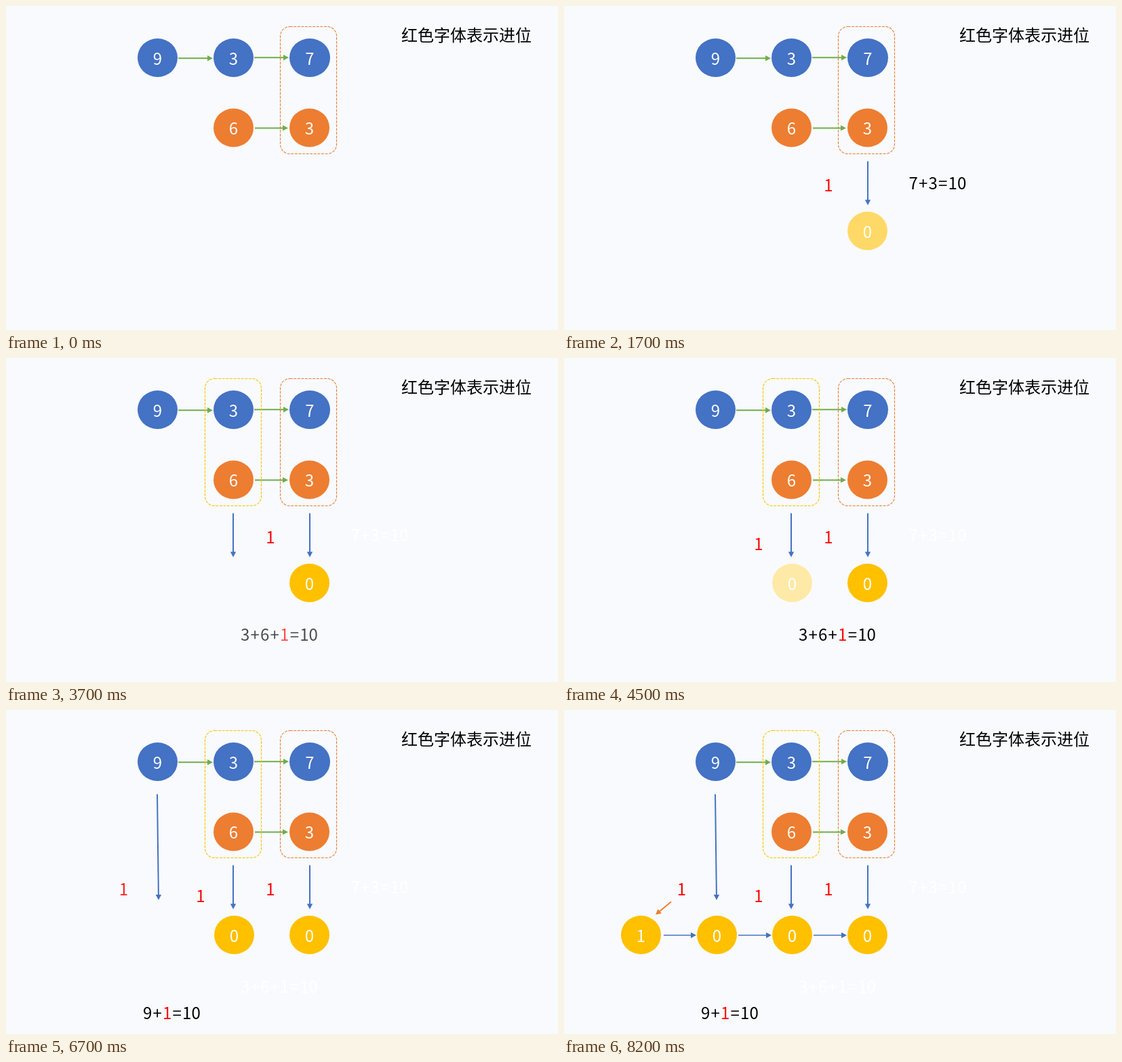
Write an HTML page that moves like this. It is 814 px wide and 479 px high and loops after 8500 ms.

```html
<!DOCTYPE html>
<html lang="zh">
<head>
<meta charset="utf-8">
<title>链表相加</title>
<style>
  html, body { margin: 0; width: 100%; height: 100%; overflow: hidden; background: #f8fafe; }
  svg { display: block; width: 814px; height: 479px; }
  text { font: 300 24px "Noto Sans CJK SC", "Noto Sans CJK", "Noto Sans", sans-serif; }
  .ghost * { fill: #fff; stroke: #fff; }
  .ghost text, .ghost tspan { stroke: none; }
  .ghost rect { fill: none; }
</style>
</head>
<body>
<svg id="stage" viewBox="0 0 814 479"></svg>
<script>
const BLUE = '#4472c4', ORANGE = '#ed7d31', GOLD = '#ffc000', GREEN = '#70ad47', RED = '#f00';
const LOOP = 8500, FRAME = 100, LAST = 8200, FADE = 487, LEAD = 50;
const stage = document.getElementById('stage');

const node = (x, y, digit, color, rx = 29.5) =>
  `<ellipse cx="${x}" cy="${y}" rx="${rx}" ry="28.5" fill="${color}"/>` +
  `<text x="${x}" y="${y + 10.3}" fill="#fff" text-anchor="middle">${digit}</text>`;

function arrow(x1, y1, x2, y2, color, width = 2) {
  const length = Math.hypot(x2 - x1, y2 - y1);
  const angle = Math.atan2(y2 - y1, x2 - x1) * 180 / Math.PI;
  return `<g transform="translate(${x1} ${y1}) rotate(${angle})">` +
    `<path d="M0 0H${length - 6}" stroke="${color}" stroke-width="${width}"/>` +
    `<path d="M${length} 0l-8 -4.2v8.4z" fill="${color}"/></g>`;
}

const frame = (x, color) =>
  `<rect x="${x}" y="30.5" width="83" height="188" rx="14" fill="none" stroke="${color}" stroke-width="1.1" stroke-dasharray="4 1.6"/>`;

const carry = (x, y) => `<text x="${x}" y="${y}" fill="${RED}" text-anchor="middle">1</text>`;

// Operators get a little air on both sides; a carried digit is red.
function sum(x, y, expr, redAt = -1) {
  const isOp = c => c === '+' || c === '=';
  const parts = [...expr].map((c, i) => {
    const dx = isOp(c) || isOp(expr[i - 1]) ? 1.2 : 0;
    return `<tspan dx="${dx}" fill="${i === redAt ? RED : '#000'}">${c}</tspan>`;
  });
  return `<text x="${x}" y="${y}">${parts.join('')}</text>`;
}

stage.innerHTML =
  node(223.5, 76.5, 9, BLUE) + node(335.5, 76.5, 3, BLUE) + node(448, 76.5, 7, BLUE, 30) +
  node(335.5, 180, 6, ORANGE) + node(447.5, 180, 3, ORANGE) +
  frame(404.5, ORANGE) +
  arrow(254, 77.3, 305, 77.3, GREEN) + arrow(366, 76.2, 417, 76.2, GREEN) +
  arrow(367, 180.4, 416, 180.4, GREEN) +
  '<text x="583" y="51.5">红色字体表示进位</text>';

// [markup, slot of the fade in, slot of the fade out]
const parts = [
  [arrow(448, 229.5, 448, 294.5, BLUE), 0],
  [sum(508.5, 271, '7+3=10'), 1, 4],
  [carry(390, 274), 2],
  [node(447.5, 332.5, 0, GOLD), 3],
  [arrow(335, 229.5, 335, 294.5, BLUE), 5],
  [frame(293.5, GOLD), 6],
  [sum(346, 418, '3+6+1=10', 4), 7, 10],
  [carry(287, 284), 8],
  [node(336.5, 332.5, 0, GOLD), 9],
  [arrow(223, 124.5, 225, 281, BLUE), 11],
  [sum(202, 457, '9+1=10', 2), 12],
  [carry(173.5, 274), 13],
  [node(225.5, 332.5, 0, GOLD), 14],
  [arrow(158, 283.5, 135, 302.5, ORANGE) + node(113.5, 332.5, 1, GOLD), 15],
  [arrow(147, 333, 195, 333, BLUE, 1.3) + arrow(257, 333, 306, 333, BLUE, 1.3) +
   arrow(368, 333, 417, 333, BLUE, 1.3), 16]
].map(([markup, from, to]) => {
  const layer = name => {
    const g = document.createElementNS('http://www.w3.org/2000/svg', 'g');
    g.setAttribute('class', name);
    g.innerHTML = markup;
    return stage.appendChild(g);
  };
  return { ghost: layer('ghost'), ink: layer('ink'), from, to };
});

const progress = (t, slot) => Math.min(1, Math.max(0, (t + LEAD - slot * FADE) / FADE));

// Every part turns from white into its colour; sums turn back to white.
function draw(now) {
  const clock = Math.floor((now % LOOP) / FRAME) * FRAME;
  const t = clock >= LAST ? LOOP : clock;
  for (const { ghost, ink, from, to } of parts) {
    const shown = t > 0 ? progress(t, from) : 0;
    ghost.style.opacity = shown > 0 ? 1 : 0;
    ink.style.opacity = to === undefined ? shown : shown * (1 - progress(t, to));
  }
}

const start = performance.now();
function tick() {
  draw(performance.now() - start);
  requestAnimationFrame(tick);
}
tick();
</script>
</body>
</html>
```
